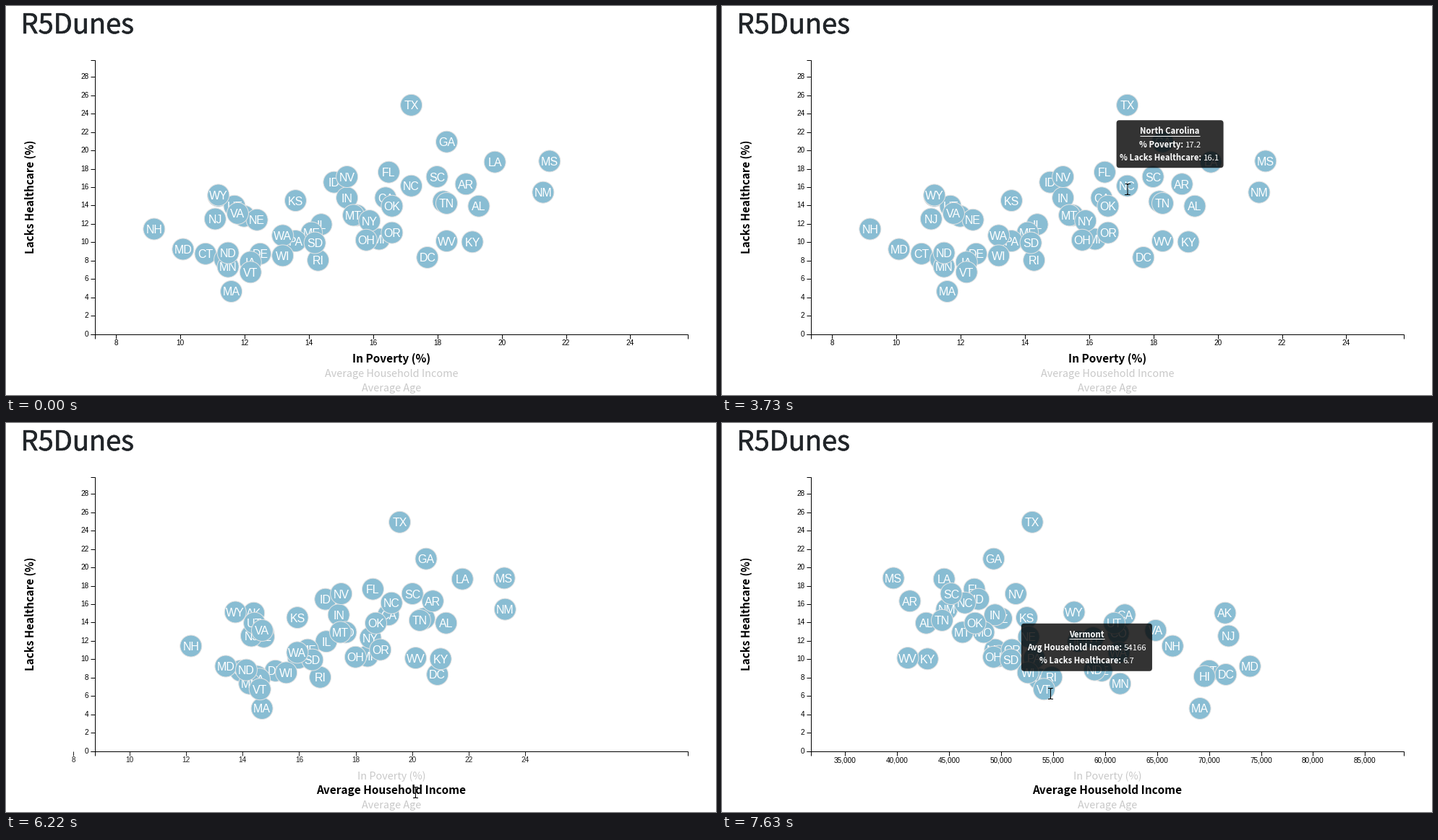
These frames come from a looping animation (982 px wide and 539 px high, 8 s). A matplotlib script:

```python
import numpy as np
import matplotlib.pyplot as plt
import matplotlib.patheffects as pe
from matplotlib.animation import FuncAnimation
from matplotlib.patches import Circle, FancyBboxPatch, Polygon

W, H, DPI = 982, 539, 100
STEP, LOOP = 40, 8000
FIRST, HOLD = 900, 156.5          # the screen refreshes every HOLD ms
MOVE_START, MOVE_TIME = 5896, 1041
LEFT, BOTTOM, WIDTH, HEIGHT = 123, 454, 820, 380
SANS, UI = "Liberation Sans", "Noto Sans CJK JP"

STATES = """AL AK AZ AR CA CO CT DE DC FL GA HI ID IL IN IA KS KY LA ME MD MA MI
MN MS MO MT NE NV NH NJ NM NY NC ND OH OK OR PA RI SC SD TN TX UT VT VA WA WV
WI WY""".split()
POVERTY = [
    19.3, 11.2, 18.2, 18.9, 16.4, 12.0, 10.8, 12.5, 17.7, 16.5, 18.3, 11.4, 14.8,
    14.4, 15.2, 12.2, 13.6, 19.1, 19.8, 14.1, 10.1, 11.6, 16.2, 11.5, 21.5, 15.5,
    15.4, 12.4, 15.2, 9.2, 11.1, 21.3, 15.9, 17.2, 11.5, 15.8, 16.6, 16.6, 13.6,
    14.3, 18.0, 14.2, 18.3, 17.2, 11.7, 12.2, 11.8, 13.2, 18.3, 13.2, 11.2]
INCOME = [
    42830, 71583, 50068, 41262, 61933, 61303, 70048, 59716, 71648, 47463, 49321,
    69592, 47861, 57444, 49446, 53712, 52504, 42958, 44555, 49462, 73971, 69160,
    49847, 61481, 39680, 48363, 46328, 52686, 51450, 66532, 71919, 44803, 58878,
    46556, 59029, 49308, 47529, 51075, 53234, 54891, 45238, 50979, 44361, 53035,
    60922, 54166, 64902, 61366, 41059, 52622, 57055]
UNCOVERED = [
    13.9, 15.0, 14.4, 16.3, 14.8, 12.8, 8.7, 8.7, 8.3, 17.6, 20.9, 8.1, 16.5,
    11.9, 14.8, 7.8, 14.5, 10.0, 18.7, 11.0, 9.2, 4.6, 10.3, 7.3, 18.8, 12.9,
    12.9, 12.4, 17.1, 11.4, 12.5, 15.4, 12.3, 16.1, 8.8, 10.2, 13.9, 11.0, 10.1,
    8.0, 17.1, 9.9, 14.2, 24.9, 13.9, 6.7, 13.1, 10.7, 10.1, 8.5, 15.1]


def x_scale(data):
    lo, hi = min(data) * 0.8, max(data) * 1.2
    return lambda v: LEFT + (np.asarray(v) - lo) / (hi - lo) * WIDTH


def y_pos(v):
    return BOTTOM - np.asarray(v) / (max(UNCOVERED) * 1.2) * HEIGHT


x_poverty, x_income = x_scale(POVERTY), x_scale(INCOME)
X_OLD, X_NEW, Y = x_poverty(POVERTY), x_income(INCOME), y_pos(UNCOVERED)

fig = plt.figure(figsize=(W / DPI, H / DPI), dpi=DPI, facecolor="white")
ax = fig.add_axes([0, 0, 1, 1])
ax.set_xlim(0, W)
ax.set_ylim(H, 0)
ax.axis("off")
renderer = fig.canvas.get_renderer()


def px(n):
    return n * 72 / DPI


def label(x, y, s, size, color="black", family=UI, ha="center", **kw):
    return ax.text(x, y, s, fontsize=px(size), color=color, family=family,
                   ha=ha, va="baseline", **kw)


def line(xs, ys, color="black", z=1):
    return ax.plot(xs, ys, color=color, lw=px(1), zorder=z,
                   solid_capstyle="butt", solid_joinstyle="miter")[0]


def text_width(t):
    return t.get_window_extent(renderer).width


# Page title and axis titles
title = label(20.5, 38, "R5Dunes", 38, "#212529", ha="left")
title.set_path_effects([pe.withStroke(linewidth=px(0.6), foreground="#212529")])
label(39, 264.5, "Lacks Healthcare (%)", 15.1, weight="bold",
      rotation=90, rotation_mode="anchor")


def choice(y, s):
    return (label(533, y, s, 15.4, weight="bold"),
            label(533, y, s, 14.4, "#c9c9c9"))


choices = [choice(494, "In Poverty (%)"),
           choice(514, "Average Household Income"),
           choice(534, "Average Age")]

# Axes
x0, y0 = LEFT + 0.5, BOTTOM + 0.5
line([x0 - 6, x0, x0, x0 - 6], [y0 - HEIGHT, y0 - HEIGHT, y0, y0])
line([x0, x0, x0 + WIDTH, x0 + WIDTH], [y0 + 6, y0, y0, y0 + 6])
for v in range(0, 29, 2):
    ty = np.floor(y_pos(v)) + 0.5
    line([x0 - 6, x0], [ty, ty])
    label(x0 - 9, ty + 3.4, str(v), 10, family=SANS, ha="right")


def x_tick(v):
    return (v, line([0, 0], [y0, y0 + 6]),
            label(0, y0 + 16, f"{v:,}", 10, family=SANS))


old_ticks = [x_tick(v) for v in range(8, 25, 2)]
new_ticks = [x_tick(v) for v in range(35000, 85001, 5000)]

# State markers
dots, names = [], []
for i, (abbr, x, y) in enumerate(zip(STATES, X_OLD, Y)):
    dots.append(ax.add_patch(Circle((x, y), 15, fc="#89bdd3", ec="#e3e3e3",
                                    lw=px(1), zorder=2 + i)))
    names.append(label(x, y + 6, abbr, 16, "white", SANS, zorder=2.5 + i))


def tooltip(abbr, xs, width, head, rows):
    i = STATES.index(abbr)
    cx, top = xs[i] + 59, Y[i] - 91
    box = FancyBboxPatch((cx - width / 2, top), width, 66, fc=(0, 0, 0, 0.8),
                         boxstyle="round,pad=0,rounding_size=4", lw=0, zorder=100)
    parts = [ax.add_patch(box)]

    def put(x, y, s, **kw):
        parts.append(label(x, y, s, 11.3, "white", zorder=101, **kw))
        return parts[-1]

    half = text_width(put(cx, top + 19, head, weight="bold")) / 2
    parts.append(line([cx - half, cx + half], [top + 21.5] * 2, "white", 101))
    for n, (key, value) in enumerate(rows):
        y = top + 37.5 + 18 * n
        bold = put(cx, y, key, weight="bold", ha="left")
        plain = put(cx, y, value, ha="left")
        wide, gap = text_width(bold), 3
        x = cx - (wide + gap + text_width(plain)) / 2
        bold.set_x(x)
        plain.set_x(x + wide + gap)
    return parts


# (start, end, artists)
tips = [
    (1650, 3050, tooltip("DC", X_OLD, 142, "Washington D.C.",
                         [("% Poverty:", "17.7"), ("% Lacks Healthcare:", "8.3")])),
    (3400, 5100, tooltip("NC", X_OLD, 148, "North Carolina",
                         [("% Poverty:", "17.2"), ("% Lacks Healthcare:", "16.1")])),
    (7450, LOOP, tooltip("VT", X_NEW, 181, "Vermont",
                         [("Avg Household Income:", "54166"),
                          ("% Lacks Healthcare:", "6.7")])),
]

# Mouse cursor: time, x, y
PATH = np.array([
    (900, 888, 508), (1057, 800, 478), (1213, 700, 440), (1370, 625, 406),
    (1526, 600, 374), (1683, 592, 362), (1839, 588.5, 355.5), (2310, 588.5, 355),
    (2465, 589, 353.5), (2778, 589, 353.5), (2934, 588, 345), (3091, 583, 318),
    (3247, 572, 282), (3404, 564, 260), (3560, 562, 256), (3717, 561, 254),
    (4969, 561, 254), (5125, 562.5, 283), (5282, 562, 335), (5438, 563, 400),
    (5595, 565, 462), (5751, 566, 506), (5908, 566.5, 512), (6847, 566.5, 512),
    (7004, 540, 470), (7160, 500, 426), (7317, 470, 395), (7473, 456, 378),
    (7630, 454.5, 375)])
BEAM_TIMES = [(1800, 3050), (3500, 5100), (5700, 6950), (7450, LOOP)]
ARROW = np.array([(0, 0), (0, 16.3), (3.8, 13), (6.4, 18.8), (8.8, 17.7),
                  (6.4, 12), (11.4, 12)])
BEAM = np.array([(-3.5, -7.5), (-1, -7.5), (0, -6.5), (1, -7.5), (3.5, -7.5),
                 (1, -7.5), (0, -6.5), (0, 6.5), (-1, 7.5), (-3.5, 7.5),
                 (-1, 7.5), (0, 6.5), (1, 7.5), (3.5, 7.5)])
arrow = ax.add_patch(Polygon(ARROW, fc="white", ec="#1a1a1a", lw=px(1.1), zorder=200))
beam = line(*BEAM.T, z=200)


def ease(t):
    t = min(max(t, 0), 1)
    return 4 * t**3 if t < 0.5 else 1 - 4 * (1 - t)**3


def place_ticks(ticks, p, alpha):
    for v, mark, text in ticks:
        x = (1 - p) * x_poverty(v) + p * x_income(v) + 0.5
        shown = 0 < x < W and alpha > 0
        for part in (mark, text):
            part.set_visible(shown)
            part.set_alpha(alpha)
        mark.set_xdata([x, x])
        text.set_x(x)


def draw(i):
    t = (i + 0.9) * STEP
    if t >= FIRST:
        t = FIRST + (t - FIRST) // HOLD * HOLD
    p = ease((t - MOVE_START) / MOVE_TIME)

    for dot, name, a, b, y in zip(dots, names, X_OLD, X_NEW, Y):
        x = a + (b - a) * p
        dot.set_center((x, y))
        name.set_x(x)
    place_ticks(old_ticks, p, 1 - p)
    place_ticks(new_ticks, p, p)

    chosen = int(t >= MOVE_START)
    for n, (active, idle) in enumerate(choices):
        active.set_visible(n == chosen)
        idle.set_visible(n != chosen)

    for start, end, parts in tips:
        for part in parts:
            part.set_visible(start <= t < end)

    spot = np.array([np.interp(t, PATH[:, 0], PATH[:, k]) for k in (1, 2)])
    typing = any(a <= t < b for a, b in BEAM_TIMES)
    arrow.set_visible(t >= FIRST and not typing)
    beam.set_visible(typing)
    arrow.set_xy(spot + ARROW)
    beam.set_data(*(spot + BEAM).T)
    return []


anim = FuncAnimation(fig, draw, frames=LOOP // STEP, interval=STEP,
                     repeat=True, repeat_delay=0, blit=False)
plt.show()
```
